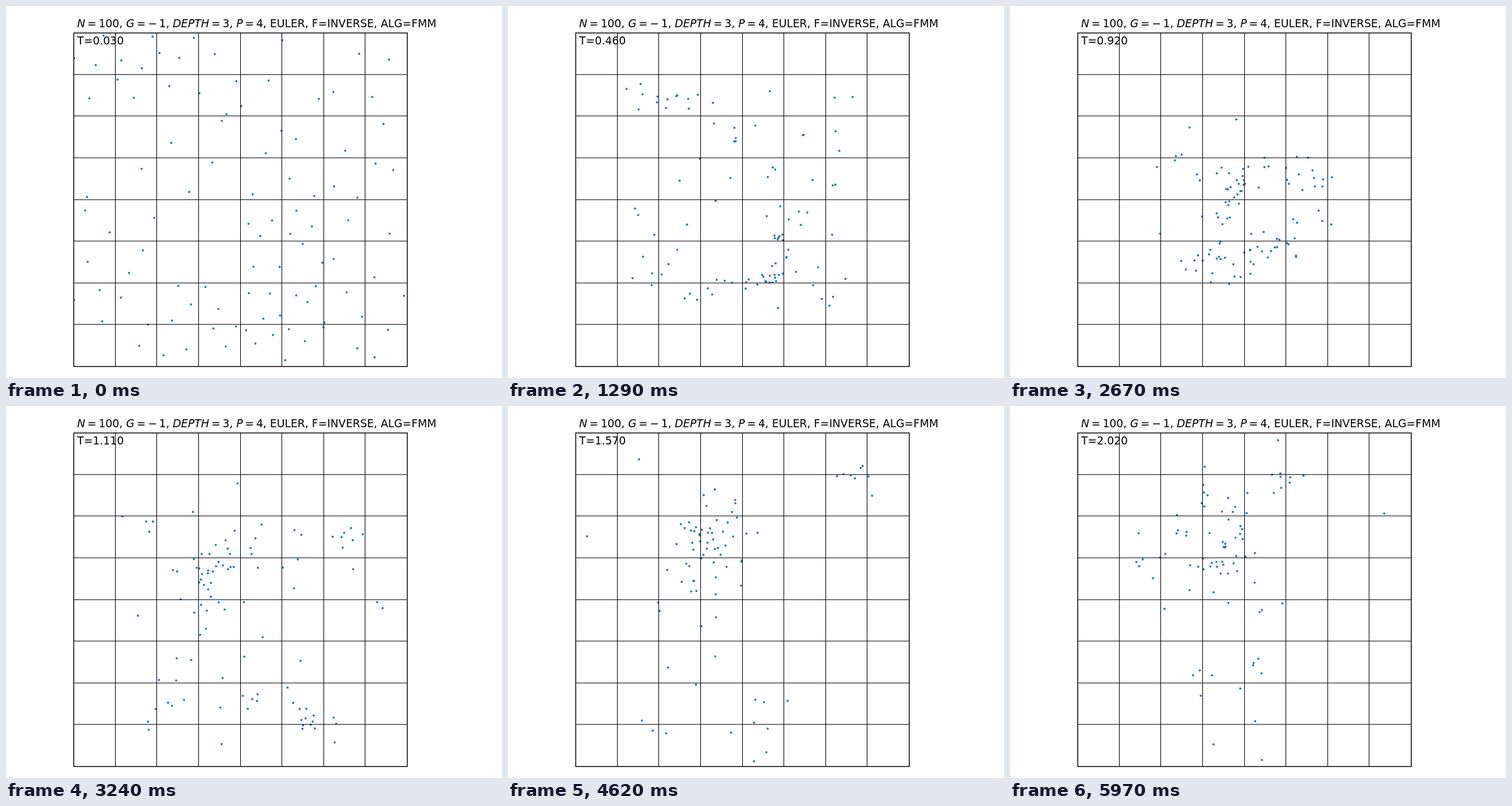
Recreate the animation shown at these times as an HTML page. Size 864 px wide and 648 px high, loop 6 s.

```html
<!DOCTYPE html>
<html lang="en">
<head>
<meta charset="utf-8">
<title>N-body simulation</title>
<style>
  html, body { margin: 0; width: 100%; height: 100%; overflow: hidden; background: #fff; }
  svg { display: block; width: 864px; height: 648px; }
  text { font: 18.82px "DejaVu Sans", sans-serif; white-space: pre; }
  .var { font-style: italic; }
  #dots { fill: #1f77b4; }
  #grid, #frame { fill: none; stroke: #000; }
</style>
</head>
<body>
<svg viewBox="0 0 864 648">
  <clipPath id="box"><rect x="118" y="47" width="581" height="581"/></clipPath>
  <g id="dots" clip-path="url(#box)"></g>
  <path id="grid" stroke-width="1.1"/>
  <rect id="frame" x="118" y="47" width="581" height="581" stroke-width="1.5"/>
  <text id="title" x="124" y="37"></text>
  <text id="clock" x="124" y="67"></text>
</svg>
<script>
const SIDE = 580.8, LEFT = 117.7, TOP = 46.7, CELLS = 8;
const STEPS = 200, STEP_MS = 30, DT = 0.01, T0 = 0.03;
const SVG = "http://www.w3.org/2000/svg";
const byId = id => document.getElementById(id);

function add(parent, tag, attrs, text = "") {
  const el = document.createElementNS(SVG, tag);
  for (const name in attrs) el.setAttribute(name, attrs[name]);
  el.textContent = text;
  return parent.appendChild(el);
}

function seeded(seed) {
  return () => {
    seed = (seed + 0x6d2b79f5) | 0;
    let t = Math.imul(seed ^ (seed >>> 15), seed | 1);
    t ^= t + Math.imul(t ^ (t >>> 7), t | 61);
    return ((t ^ (t >>> 14)) >>> 0) / 2 ** 32;
  };
}

// Number of bodies at rest in each region of a 4 by 4 split of the square.
const density = [
  [9, 8, 4, 4],
  [2, 4, 6, 6],
  [6, 0, 10, 4],
  [6, 10, 14, 7]
];

// Scatter each region's bodies loosely but evenly.
function scatter() {
  const random = seeded(7), size = SIDE / density.length, list = [];
  density.forEach((row, r) => row.forEach((count, c) => {
    const phase = random();
    for (let i = 0; i < count; i++) {
      const u = (i + random()) / count;
      const v = (phase + i * 0.618 + random() * 0.3) % 1;
      list.push({ x: LEFT + (c + u) * size, y: TOP + (r + v) * size, vx: 0, vy: 0 });
    }
  }));
  return list;
}

const bodies = scatter();
const pull = SIDE * SIDE / bodies.length;

// Add the attraction of every pair, falling off as 1/r, over a time dt.
function kick(dt) {
  for (let i = 0; i < bodies.length; i++) {
    const a = bodies[i];
    for (let j = 0; j < i; j++) {
      const b = bodies[j];
      const dx = b.x - a.x, dy = b.y - a.y;
      const k = pull * dt / (dx * dx + dy * dy + 1e-3);
      a.vx += k * dx;
      a.vy += k * dy;
      b.vx -= k * dx;
      b.vy -= k * dy;
    }
  }
}

function drift(dt) {
  for (const b of bodies) {
    b.x += b.vx * dt;
    b.y += b.vy * dt;
  }
}

const history = [];
kick(T0);
for (let n = 0; n < STEPS; n++) {
  history.push(bodies.map(({ x, y }) => [x, y]));
  drift(DT);
  kick(DT);
}

let lines = "";
for (let i = 1; i < CELLS; i++) {
  const d = i * SIDE / CELLS;
  const x = Math.floor(LEFT + d) + 0.5, y = Math.floor(TOP + d) + 0.5;
  lines += `M${x} ${TOP}v${SIDE}M${LEFT} ${y}h${SIDE}`;
}
byId("grid").setAttribute("d", lines);

// Variables in italics, with math spacing around the signs.
const formula = "N|=|100, |G|=|−|1, |DEPTH|=|3, |P|=|4, EULER, F=INVERSE, ALG=FMM";
formula.split("|").forEach((part, i, parts) => {
  const spaced = part === "=" || /^[=−]$/.test(parts[i - 1]);
  const style = /^[A-Z]+$/.test(part) ? "var" : "";
  add(byId("title"), "tspan", { class: style, dx: spaced ? 3.77 : 0 }, part);
});

const dots = bodies.map(() => add(byId("dots"), "circle", { r: 1.9 }));

function draw(step) {
  history[step].forEach(([x, y], i) => {
    dots[i].setAttribute("cx", x.toFixed(2));
    dots[i].setAttribute("cy", y.toFixed(2));
  });
  byId("clock").textContent = "T=" + (T0 + step * DT).toFixed(3);
}

const began = performance.now();
let shown = 0;
function tick() {
  const step = Math.floor((performance.now() - began) / STEP_MS) % STEPS;
  if (step !== shown) draw(shown = step);
  requestAnimationFrame(tick);
}
draw(0);
requestAnimationFrame(tick);
</script>
</body>
</html>
```
